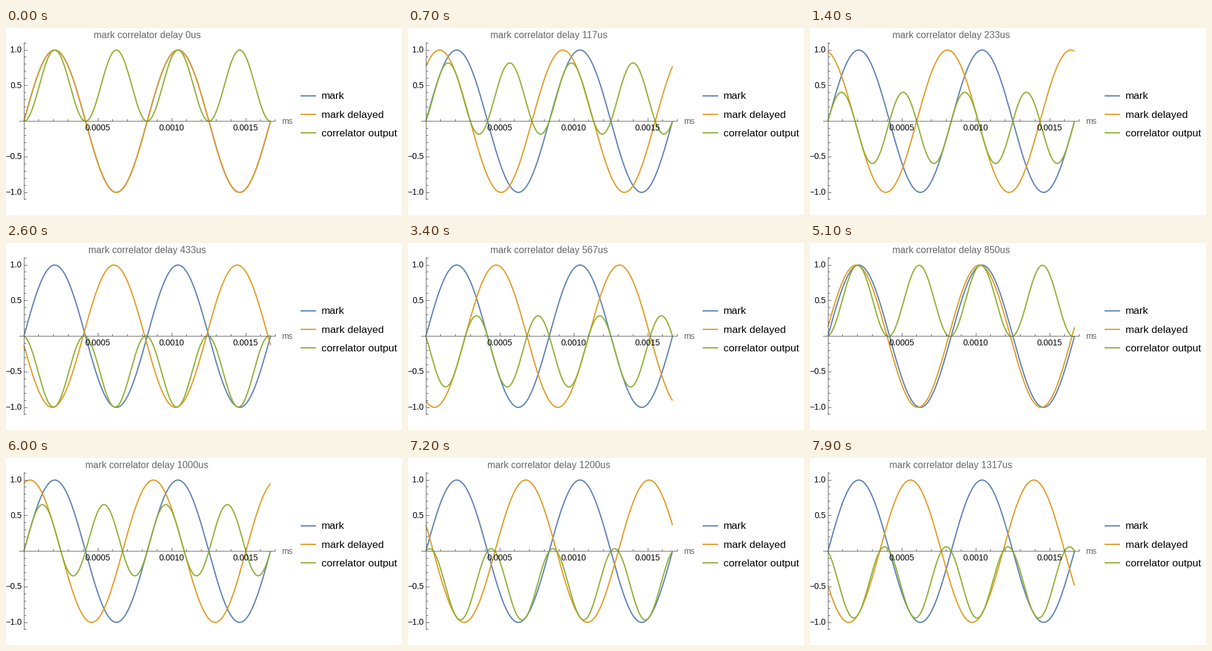
A matplotlib script for the animation above (8000 ms loop, 664 by 314 pixels).

```python
import numpy as np
import matplotlib.pyplot as plt
from matplotlib.animation import FuncAnimation
from matplotlib.collections import LineCollection

W, H, DPI = 664, 314, 100
FRAMES, INTERVAL = 80, 100
FREQ = 1200                      # Hz
STEP = 1 / 60000                 # delay added per frame, s
X0, Y0 = 30, 156.5               # pixel position of the origin
SX, SY = 248100, 119.5           # pixels per second, pixels per unit
TICK_FONT = 13.9
GRAY = "#666666"
BLUE, ORANGE, GREEN = "#5e81b5", "#e19c24", "#8fb032"

plt.rcParams["font.family"] = "Liberation Sans"
plt.rcParams["path.snap"] = False
fig = plt.figure(figsize=(W / DPI, H / DPI), dpi=DPI, facecolor="white")
ax = fig.add_axes([0, 0, 1, 1])
ax.set_xlim(0, W)
ax.set_ylim(H, 0)
ax.axis("off")


def px(size):
    return size * 72 / DPI


def crisp(v):
    """Centre of the pixel that holds v."""
    return np.floor(v) + 0.5


def label(x, y, text, size, color="black", ha="left"):
    return ax.text(x, y, text, fontsize=px(size), color=color, ha=ha,
                   va="baseline", zorder=5)


def stroke(xs, ys, color):
    return ax.plot(xs, ys, color=color, lw=px(2.1),
                   solid_capstyle="butt", zorder=2)[0]


def draw_axes():
    ox, oy = crisp(X0), crisp(Y0)
    segs = [[(22, oy), (452, oy)], [(ox, 24), (ox, 289)]]
    for i in range(1, 18):
        x = X0 + i * 1e-4 * SX
        major = i % 5 == 0
        segs.append([(crisp(x), oy), (crisp(x), oy - (5.5 if major else 3.5))])
        if major:
            label(x, 172, f"{i * 1e-4:.4f}", TICK_FONT, ha="center")
    for i in range(-11, 12):
        y = Y0 - i * 0.1 * SY
        major = i % 5 == 0
        segs.append([(ox, crisp(y)), (ox + (5.5 if major else 3.5), crisp(y))])
        if major and i:
            text = f"{i / 10:.1f}".replace("-", "\u2212")
            label(26.5, round(y + 4.1), text, TICK_FONT, ha="right")
    ax.add_collection(LineCollection(segs, colors=GRAY, linewidths=px(1),
                                     zorder=4))
    label(462.5, 161, "ms", TICK_FONT, GRAY)


def draw_legend():
    rows = [("mark", BLUE, 114, 119), ("mark delayed", ORANGE, 145, 151),
            ("correlator output", GREEN, 176, 182)]
    for text, color, y, base in rows:
        stroke([494, 520], [y, y], color)
        label(529, base, text, 17.4)


draw_axes()
draw_legend()
title = label(236.5, 17, "", 15.92, GRAY, "center")

t = np.linspace(0, 2 / FREQ, 500)
xs = X0 + t * SX
mark = np.sin(2 * np.pi * FREQ * t)
lines = [stroke([], [], c) for c in (BLUE, ORANGE, GREEN)]


def update(n):
    delay = n * STEP
    delayed = np.sin(2 * np.pi * FREQ * (t + delay))
    for line, wave in zip(lines, (mark, delayed, mark * delayed)):
        line.set_data(xs, Y0 - SY * wave)
    title.set_text(f"mark correlator delay {delay * 1e6:.0f}us")
    return [*lines, title]


anim = FuncAnimation(fig, update, frames=FRAMES, interval=INTERVAL,
                     repeat=True, repeat_delay=0, blit=False)
plt.show()
```
